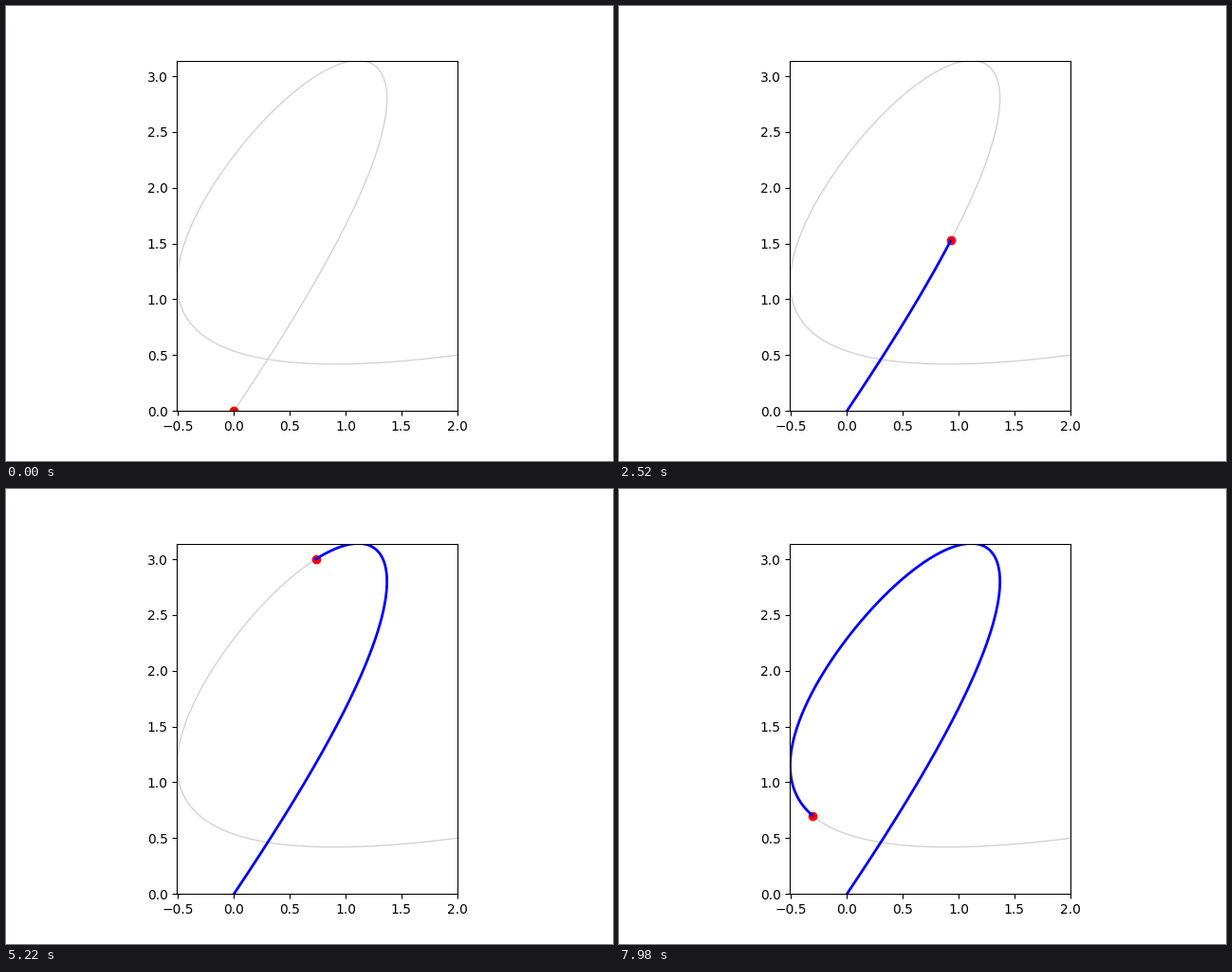
A matplotlib script for the animation above (8 s loop, 640x480 px).

```python
from math import comb

import numpy as np
import matplotlib.pyplot as plt
from matplotlib.animation import FuncAnimation

FRAMES, INTERVAL = 267, 30
STEPS = 380  # steps for the whole path; the loop ends before the goal

# Bezier control points from the start (0, 0) to the goal (2, 0.5)
CONTROL = np.array([
    (0.0, 0.0), (2.465, 3.681), (1.328, 3.330), (0.925, 3.955),
    (-0.018, 2.331), (-1.012, 1.358), (-1.697, 0.026), (2.0, 0.5),
])


def ease(t):
    """Rest-to-rest quintic."""
    return t**3 * (10 - 15 * t + 6 * t**2)


def bezier(points, s):
    n = len(points) - 1
    return sum(comb(n, k) * np.outer(p, s**k * (1 - s)**(n - k))
               for k, p in enumerate(points))


x, y = bezier(CONTROL, ease(np.linspace(0, 1, STEPS + 1)))

fig, ax = plt.subplots(figsize=(6.4, 4.8), dpi=100)
ax.set_aspect("equal")
ax.set_xlim(-0.51, 2)
ax.set_ylim(0, 3.14)
ax.plot(x, y, color="lightgrey", lw=1)
dot, = ax.plot([], [], "ro")
trail, = ax.plot([], [], "b-", lw=2)


def draw(i):
    trail.set_data(x[:i + 1], y[:i + 1])
    dot.set_data([x[i]], [y[i]])
    return trail, dot


anim = FuncAnimation(fig, draw, frames=FRAMES, interval=INTERVAL, repeat=True)
plt.show()
```
